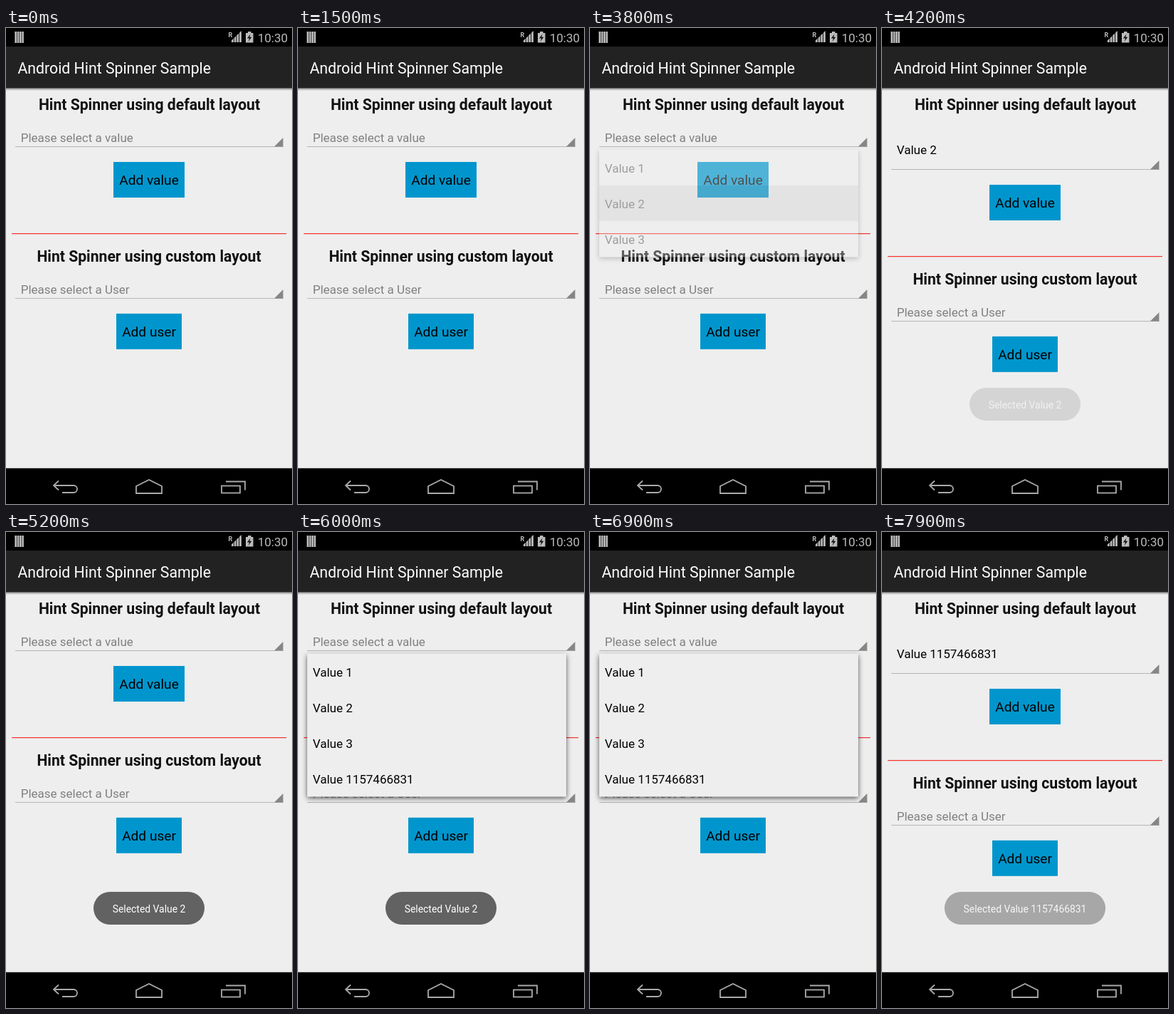
An HTML page with a canvas that plays this animation: 402x668 px, repeating every 8 s.

```html
<!DOCTYPE html>
<html lang="en">
<head>
<meta charset="utf-8">
<title>Hint spinner</title>
<style>
html, body { margin: 0; width: 100%; height: 100%; overflow: hidden; background: #eee; }
canvas { display: block; width: 402px; height: 668px; }
</style>
</head>
<body>
<canvas id="stage" width="402" height="668"></canvas>
<script>
const screen2d = document.getElementById('stage').getContext('2d');
const layer = document.createElement('canvas');
layer.width = 402;
layer.height = 668;
const layer2d = layer.getContext('2d');
let ctx = screen2d;

const LOOP = 8000, STEP = 100;
const clamp = v => Math.max(0, Math.min(1, v));
const ramp = (t, start, length) => clamp((t - start) / length);
const within = (t, start, end) => t >= start && t < end;

function box(x, y, w, h, color) {
  ctx.fillStyle = color;
  ctx.fillRect(x, y, w, h);
}

function label(str, x, y, size, color = '#000', align = 'left', style = '') {
  ctx.font = `${style} ${size}px Roboto, sans-serif`;
  ctx.textAlign = align;
  ctx.fillStyle = color;
  ctx.fillText(str, x, y);
}

function path(points, close) {
  ctx.beginPath();
  points.forEach(([x, y]) => ctx.lineTo(x, y));
  if (close) ctx.closePath();
}

function polygon(points, color) {
  path(points, true);
  ctx.fillStyle = color;
  ctx.fill();
}

// Paints on a separate layer so that overlapping parts fade as one.
function faded(alpha, paint) {
  if (alpha <= 0) return;
  layer2d.clearRect(0, 0, layer.width, layer.height);
  ctx = layer2d;
  paint();
  ctx = screen2d;
  ctx.globalAlpha = alpha;
  ctx.drawImage(layer, 0, 0);
  ctx.globalAlpha = 1;
}

function statusBar() {
  box(0, 0, 402, 26, '#000');
  for (let i = 0; i < 4; i++) box(12.4 + i * 3.3, 5, 2.6, 16, '#bbb');
  label('R', 312.5, 12.5, 9, '#bbb', 'left', 'bold');
  for (let i = 0; i < 4; i++) {
    const x = 317 + i * 3.7;
    polygon([[x, 20], [x, 17.5 - i * 3.6], [x + 2.8, 14.8 - i * 3.6], [x + 2.8, 20]], '#bbb');
  }
  box(337, 7, 10.5, 13.5, '#bbb');
  box(340, 5, 4.5, 2, '#bbb');
  polygon([[343.5, 8.5], [339, 14.5], [342, 14.5], [340.7, 19], [345.3, 12.8], [342.4, 12.8]], '#111');
  label('10:30', 396, 19.5, 17, '#bbb', 'right');
}

function actionBar() {
  box(0, 26, 402, 58.5, '#222');
  const shade = ctx.createLinearGradient(0, 84.5, 0, 88);
  shade.addColorStop(0, 'rgba(0,0,0,.4)');
  shade.addColorStop(1, 'rgba(0,0,0,0)');
  box(0, 84.5, 402, 3.5, shade);
  label('Android Hint Spinner Sample', 16.5, 63.7, 21.25, '#fff');
}

function navBar() {
  box(0, 617.8, 402, 50.2, '#000');
  ctx.strokeStyle = '#aaa';
  ctx.lineWidth = 1.8;
  ctx.beginPath();
  ctx.moveTo(74, 635.5);
  ctx.lineTo(67, 642);
  ctx.lineTo(74, 648.5);
  ctx.moveTo(68, 642);
  ctx.lineTo(94.5, 642);
  ctx.arc(95, 647, 5, -Math.PI / 2, Math.PI / 2);
  ctx.lineTo(79, 652);
  ctx.stroke();
  path([[183, 643], [201, 634], [219, 643], [219, 653], [183, 653]], true);
  ctx.stroke();
  ctx.strokeRect(303, 642.5, 26, 10);
  path([[309, 636.5], [336, 636.5], [336, 648.5]]);
  ctx.stroke();
}

function spinner(text, baseline, lineY, hint, pressed) {
  if (pressed) {
    ctx.beginPath();
    ctx.roundRect(9, lineY - 28, 384, 32, 2);
    ctx.fillStyle = '#dadada';
    ctx.fill();
  }
  label(text, 20.7, baseline, 17, hint ? '#808080' : '#000');
  box(13, lineY, 377, 1, '#b5b5b5');
  polygon([[389.5, lineY - 12], [389.5, lineY + 0.5], [377, lineY + 0.5]], pressed ? '#666' : '#868686');
}

function button(text, y, w) {
  box(201 - w / 2, y, w, 50, '#0096cd');
  label(text, 201, y + 32, 19.1, '#000', 'center');
}

function popup(count, alpha, pressedRow) {
  faded(alpha, () => {
    ctx.shadowColor = 'rgba(0,0,0,.65)';
    ctx.shadowBlur = 7;
    ctx.shadowOffsetY = 2;
    box(13, 170.5, 364, count * 50 + 1, '#eee');
    ctx.shadowColor = 'transparent';
    if (pressedRow >= 0) box(13, 171 + pressedRow * 50, 364, 50, '#d0d0d0');
    for (let i = 0; i < count; i++) {
      label(i < 3 ? `Value ${i + 1}` : 'Value 1157466831', 20.7, 202.8 + i * 50, 17);
    }
  });
}

function toast(value, alpha) {
  const text = `Selected ${value}`;
  faded(alpha, () => {
    const size = 13.9;
    ctx.font = `${size}px Roboto, sans-serif`;
    const w = ctx.measureText(text).width + 53.5;
    ctx.beginPath();
    ctx.roundRect(201 - w / 2, 505, w, 46, 23);
    ctx.fillStyle = '#626262';
    ctx.fill();
    label(text, 201, 533.5, size, '#fff', 'center');
  });
}

function draw(t) {
  const value = t >= 7600 ? 'Value 1157466831' : within(t, 4000, 4900) ? 'Value 2' : '';
  const shift = value ? 32 : 0;
  const pressed = within(t, 2800, 3100) || within(t, 5600, 5900);

  box(0, 0, 402, 668, '#eee');
  statusBar();
  actionBar();
  label('Hint Spinner using default layout', 201.5, 115.3, 21.15, '#111', 'center', 'bold');
  spinner(value || 'Please select a value', value ? 176.5 : 160, 166 + shift, !value, pressed);
  button('Add value', 188 + shift, 100);
  box(8, 288 + shift, 386, 1.2, '#f5302c');
  label('Hint Spinner using custom layout', 201, 328.3 + shift, 21.15, '#111', 'center', 'bold');
  spinner('Please select a User', 373 + shift, 379 + shift, true, false);
  button('Add user', 400.8 + shift, 92);

  popup(3, ramp(t, 3000, 300) * (1 - ramp(t, 3600, 300)), within(t, 3500, 3900) ? 1 : -1);
  popup(4, ramp(t, 5800, 200) * (1 - ramp(t, 7200, 300)), within(t, 7100, 7500) ? 3 : -1);
  toast('Value 2', ramp(t, 4110, 500) * (1 - ramp(t, 6210, 500)));
  toast('Value 1157466831', ramp(t, 7650, 500));
  navBar();
}

function tick(now) {
  draw(Math.floor((now % LOOP) / STEP) * STEP);
  requestAnimationFrame(tick);
}
draw(0);
requestAnimationFrame(tick);
</script>
</body>
</html>
```
